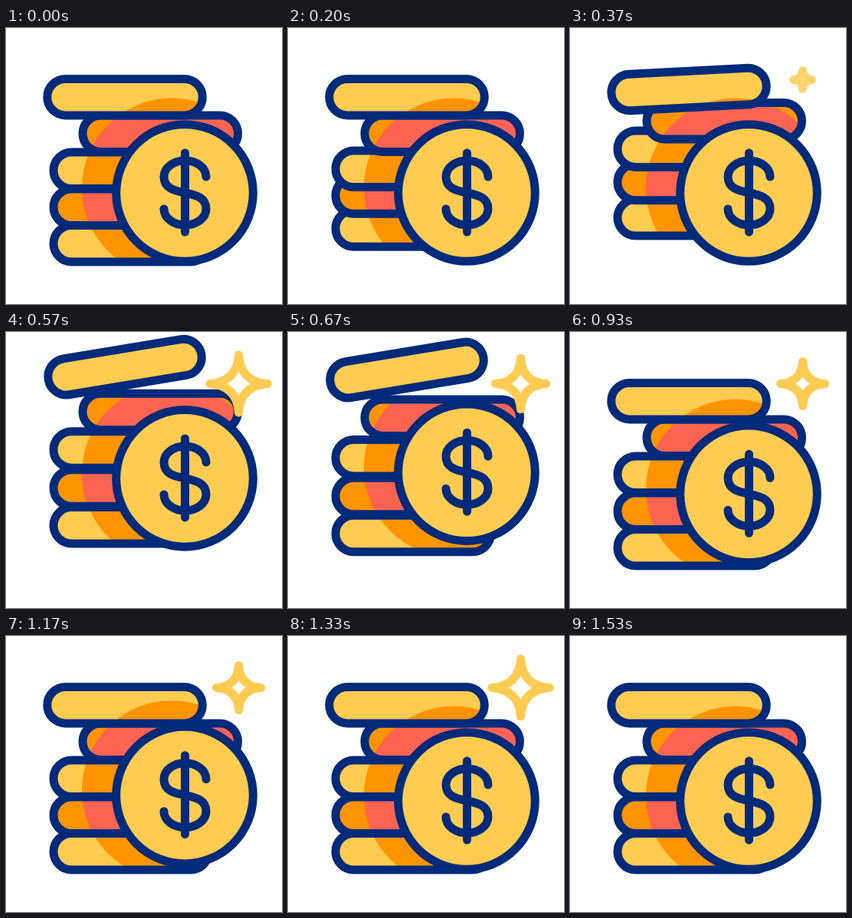
An HTML page with a canvas that plays this animation: 360 by 360 pixels, repeating every 2000 ms.

```html
<!DOCTYPE html>
<html lang="en">
<head>
<meta charset="utf-8">
<title>Bouncing coins</title>
<style>
  html, body { margin: 0; height: 100%; overflow: hidden; background: #fff; }
  canvas { display: block; }
</style>
</head>
<body>
<canvas id="stage" width="360" height="360"></canvas>
<script>
const LOOP = 2000;
const NAVY = '#002a7a', YELLOW = '#ffcb50', ORANGE = '#ff9400', RED = '#ff6352';
const BAR_W = 202.5, BAR_H = 47.5;
const ctx = document.getElementById('stage').getContext('2d');

// Bottom to top; each hop runs from start to land (ms).
const bars = [
  { x: 62, y: 257.5, base: YELLOW, shade: ORANGE, start: 60, land: 800, height: 35 },
  { x: 62, y: 210, base: ORANGE, shade: RED, start: 100, land: 805, height: 35 },
  { x: 62, y: 162, base: YELLOW, shade: ORANGE, start: 190, land: 800, height: 35 },
  { x: 100, y: 114, base: ORANGE, shade: RED, start: 285, land: 820, height: 34 },
  { x: 53.8, y: 66.4, base: YELLOW, shade: ORANGE, start: 333, land: 860, height: 45, tilt: 9.7 },
];

const sparkleKeys = [[250, 0], [570, 37.5], [770, 29], [1200, 29], [1330, 37.5], [1520, 0]];
const dollar = new Path2D('M233.5 163V266M261 194A27.5 21 0 0 0 206 194' +
  'C206 209 219 212 233.5 215S261 221 261 236A27.5 21 0 0 1 206 236');

function hop(t, start, land, height) {
  return t > start && t < land ? height * Math.sin(Math.PI * (t - start) / (land - start)) : 0;
}

function keyed(t, keys) {
  for (let i = 1; i < keys.length; i++) {
    const [t0, a] = keys[i - 1], [t1, b] = keys[i];
    if (t >= t0 && t < t1) return a + (b - a) * (1 - Math.cos(Math.PI * (t - t0) / (t1 - t0))) / 2;
  }
  return 0;
}

function fillCircle(x, y, r, color) {
  ctx.beginPath();
  ctx.arc(x, y, r, 0, 2 * Math.PI);
  ctx.fillStyle = color;
  ctx.fill();
}

function drawBar(bar, t, coinLift) {
  const tilt = hop(t, 310, 930, bar.tilt || 0) * Math.PI / 180;
  const outline = new Path2D();
  outline.roundRect(-BAR_W / 2, -BAR_H / 2, BAR_W, BAR_H, BAR_H / 2);
  ctx.save();
  ctx.translate(bar.x + BAR_W / 2, bar.y + BAR_H / 2 - hop(t, bar.start, bar.land, bar.height));
  ctx.rotate(-tilt);
  ctx.fillStyle = bar.base;
  ctx.fill(outline);
  ctx.save();
  ctx.clip(outline);
  ctx.resetTransform();
  fillCircle(216, 208.5 - coinLift, 117, bar.shade);
  ctx.restore();
  ctx.stroke(outline);
  ctx.restore();
}

function drawCoin(lift) {
  ctx.save();
  ctx.translate(0, -lift);
  fillCircle(233, 215, 89.3, YELLOW);
  ctx.stroke();
  ctx.stroke(dollar);
  ctx.restore();
}

function drawSparkle(size) {
  if (size <= 0) return;
  const c = size * 0.06;
  ctx.save();
  ctx.translate(303.5, 67.5);
  ctx.globalAlpha = Math.min(1, size / 14);
  ctx.strokeStyle = YELLOW;
  ctx.beginPath();
  ctx.moveTo(0, -size);
  ctx.quadraticCurveTo(c, -c, size, 0);
  ctx.quadraticCurveTo(c, c, 0, size);
  ctx.quadraticCurveTo(-c, c, -size, 0);
  ctx.quadraticCurveTo(-c, -c, 0, -size);
  ctx.closePath();
  ctx.stroke();
  ctx.restore();
}

function draw(now) {
  const t = now % LOOP;
  const coinLift = hop(t, 430, 950, 32) + hop(t, 950, 1300, 8);
  ctx.clearRect(0, 0, 360, 360);
  ctx.lineWidth = 11;
  ctx.lineCap = ctx.lineJoin = 'round';
  ctx.strokeStyle = NAVY;
  for (const bar of bars) drawBar(bar, t, coinLift);
  drawCoin(coinLift);
  drawSparkle(keyed(t, sparkleKeys));
}

const began = performance.now();
function tick() {
  draw(performance.now() - began);
  requestAnimationFrame(tick);
}
tick();
</script>
</body>
</html>
```
